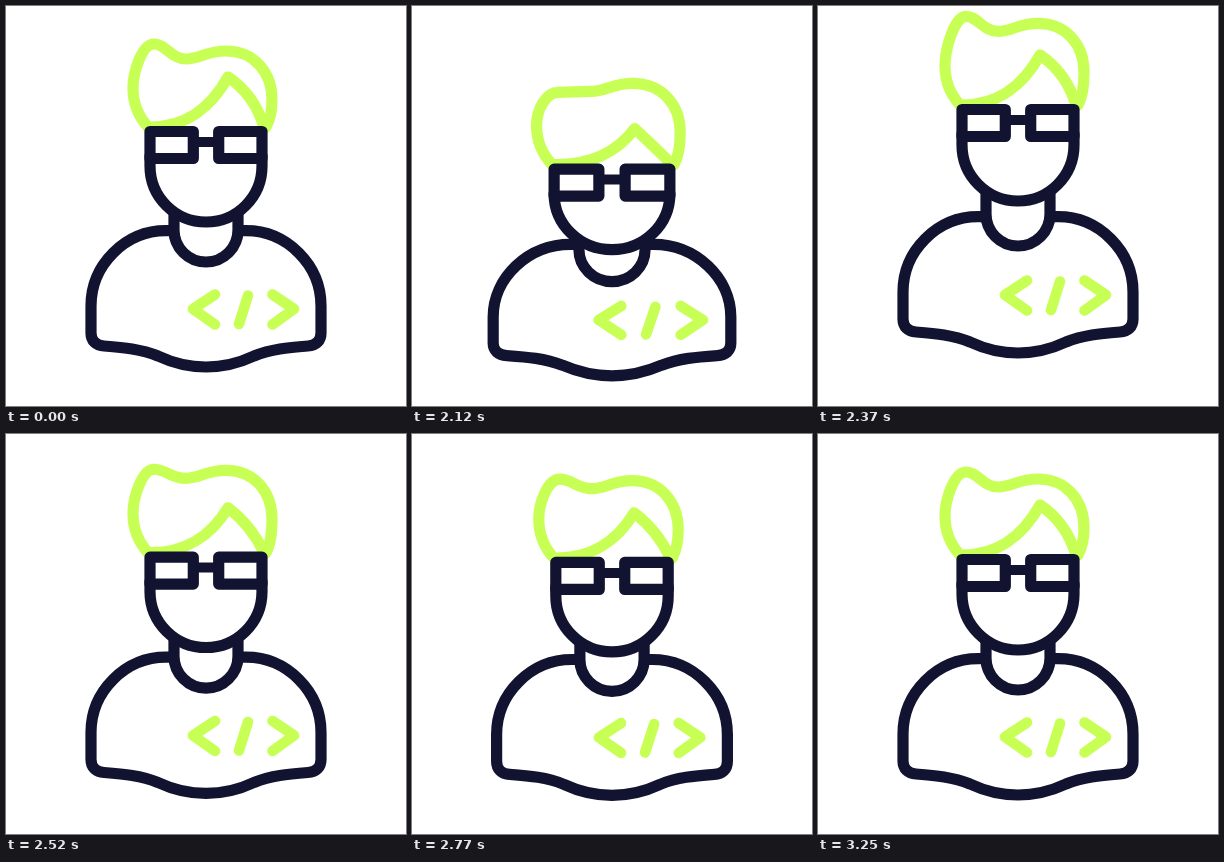
Recreate the animation shown at these times as an HTML page. Size 400 by 400 pixels, loop 3.27 s.

```html
<!DOCTYPE html>
<html lang="en">
<head>
<meta charset="utf-8">
<title>Developer icon</title>
<style>
html, body { margin: 0; width: 100%; height: 100%; overflow: hidden; background: #fff; }
svg { display: block; width: 100%; height: 100%; }
path { fill: none; stroke-width: 11.2; stroke-linecap: round; stroke-linejoin: round; }
.lime { stroke: #c8ff55; }
.navy { stroke: #121331; }
</style>
</head>
<body>
<svg viewBox="0 0 400 400">
  <path id="hair" class="lime"/>
  <path id="body" class="navy"/>
  <path id="neck" class="navy"/>
  <path id="face" class="navy"/>
  <path id="specs" class="navy"/>
  <path id="bridge" class="navy" style="stroke-width:10"/>
  <path id="code" class="lime" style="stroke-width:10.6"/>
</svg>
<script>
const LOOP = 3270;

const ease = u => {
  u = Math.min(1, Math.max(0, u));
  return u * u * (3 - 2 * u);
};

// eased rise from 0 to 1 at the peak, then back to 0
const pulse = (t, from, peak, to) =>
  t < peak ? ease((t - from) / (peak - from)) : ease((to - t) / (to - peak));

// crouch, jump, land, rebound, settle
const crouch = (t, end) => pulse(t, 1990, 2110, end);
const land = t => pulse(t, 2520, 2650, 2800);
const jump = t => pulse(t, 2150, 2370, 2560);
const rebound = t => pulse(t, 2740, 2850, 3010) - 0.25 * pulse(t, 3000, 3110, 3250);
const flop = t => pulse(t, 2000, 2115, 2370) + pulse(t, 2430, 2650, 2850);

const set = (id, d) => document.getElementById(id).setAttribute('d', d);

function draw(t) {
  const low = crouch(t, 2240) + land(t);
  const lowHead = crouch(t, 2290) + land(t);
  const up = jump(t), spring = rebound(t), bend = flop(t);

  // vertical shift of each part
  const hem = 9 * low - 14 * up - 3 * spring;
  const sh = 14 * low - 14 * up - 3 * spring;
  const col = 20 * low - 16 * up - 3 * spring;
  const chin = 28 * lowHead - 21 * up - 4 * spring;
  const g = 38 * lowHead - 22 * up - 4 * spring;
  const crown = 33 * low - 29 * jump(t - 30) - 8 * spring;
  const quiff = crown + 16 * bend;
  const part = g + 14 * bend;
  const mid = (part + g) / 2;

  const wide = 1 + 0.034 * low;
  const P = (x, y) => (200 + (x - 200) * wide).toFixed(2) + ' ' + y.toFixed(2) + ' ';
  const T = (x, y) => P(x, y + sh + (hem - sh) * (y - 224) / 137);

  set('hair',
    'M' + P(142, 121 + g) +
    'C' + P(132, 110 + g) + P(127, 97 + g) + P(127, 82 + g) +
    'C' + P(127, 66 + g) + P(136, 38 + quiff) + P(148, 38 + quiff) +
    'C' + P(160, 38 + quiff) + P(165, 53 + crown) + P(180, 53 + crown) +
    'C' + P(194, 53 + crown) + P(200, 45 + crown) + P(220, 45 + crown) +
    'C' + P(248, 45 + crown) + P(266, 66 + crown) + P(266, 94 + crown) +
    'C' + P(266, 106 + crown) + P(264, 114 + g) + P(260, 121 + g) +
    'M' + P(142, 121 + g) +
    'C' + P(180, 122 + g) + P(206, 100 + mid) + P(222, 71 + part) +
    'C' + P(240 - 6 * bend, 83 + part) + P(252 - 6 * bend, 101 + mid) + P(258, 121 + g));

  // half of the torso, then its mirror
  const half = m => {
    const Q = (x, y) => T(m ? 400 - x : x, y);
    return 'M' + Q(167, 224.7) + 'L' + Q(160, 224.7) +
      'C' + Q(119, 224.7) + Q(85, 259) + Q(85, 300) + 'L' + Q(85, 327) +
      'C' + Q(85, 335) + Q(90, 339.5) + Q(98, 340) +
      'C' + Q(118, 341.5) + Q(135, 343) + Q(152, 350) +
      'C' + Q(168, 357.5) + Q(184, 361) + Q(200, 361);
  };
  set('body', half(false) + half(true));

  const arc = (x, y, depth) => 'A' + (200 - x) * wide + ' ' + depth + ' 0 0 0 ' + P(400 - x, y);
  const cup = (x, top, y, depth) =>
    'M' + P(x, top) + 'L' + P(x, y) + arc(x, y, depth) + 'L' + P(400 - x, top);
  set('neck', cup(168, 208 + chin, 224 + col, 32));
  set('face', cup(144, 150 + g, 160 + chin, 56));

  const lens = (a, b) => 'M' + P(a, 125.5 + g) + 'L' + P(b, 125.5 + g) +
    P(b, 152.5 + g) + P(a, 152.5 + g) + 'Z';
  set('specs', lens(144, 187.3) + lens(212.7, 256));
  set('bridge', 'M' + P(188, 136 + g) + 'L' + P(212, 136 + g));

  const chevron = (back, tip) =>
    'M' + T(back, 288.5) + 'L' + T(tip, 303) + T(back, 318.5);
  set('code', chevron(209, 187) + chevron(266.5, 288) +
    'M' + T(242, 289.5) + 'L' + T(233, 318));
}

const start = performance.now();
function tick() {
  draw((performance.now() - start) % LOOP);
  requestAnimationFrame(tick);
}
tick();
</script>
</body>
</html>
```
